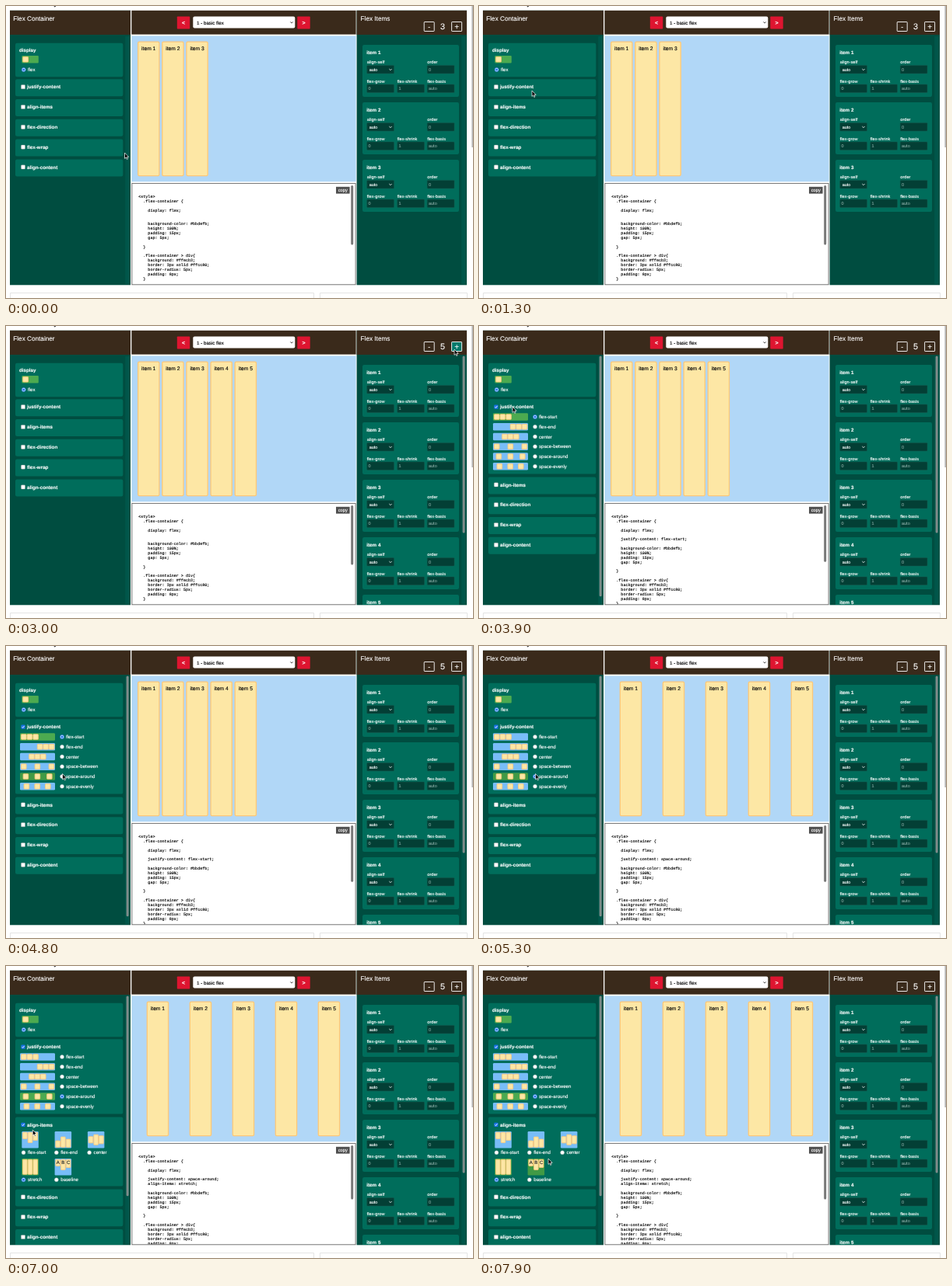
An HTML page that plays this animation: 600 by 376 pixels, repeating every 8000 ms.

```html
<!DOCTYPE html>
<html lang="en">
<head>
<meta charset="utf-8">
<title>Flex playground</title>
<style>
  html, body { margin: 0; width: 100%; height: 100%; overflow: hidden; background: #fff; }
  svg { display: block; width: 600px; height: 376px; }
  text { font-family: "Liberation Sans", Arial, sans-serif; white-space: pre; text-rendering: geometricPrecision; }
  .code { font-family: "Liberation Mono", monospace; }
</style>
</head>
<body>
<svg id="stage" viewBox="0 0 600 376">
  <defs>
    <clipPath id="leftClip"><rect x="5" y="38" width="155" height="321"/></clipPath>
    <clipPath id="rightClip"><rect x="450" y="38" width="142" height="321"/></clipPath>
    <clipPath id="codeClip"><rect x="163" y="229" width="285" height="129.3"/></clipPath>
  </defs>
  <g id="base"></g>
  <g id="page"></g>
  <path id="cursor" d="M0 0V7.4L1.7 5.9L2.8 8.4L4 7.9L2.9 5.4H5.2Z" fill="#000" stroke="#fff" stroke-width=".7"/>
</svg>
<script>
const DURATION = 8000;
const C = {
  brown: '#3a2a1b', panel: '#004d40', card: '#006d5b', input: '#033f35',
  sky: '#b1d7f7', blue: '#78bdf8', green: '#4caa50', hover: '#419a45', cream: '#fde7a5',
  orange: '#ffc877', accent: '#1a73e8', red: '#de1530', thumb: '#7f8c89'
};

const rect = (x, y, w, h, fill, r = 0, extra = '') =>
  `<rect x="${x}" y="${y}" width="${w}" height="${h}" rx="${r}" fill="${fill}" ${extra}/>`;
const line = (d, stroke, w) =>
  `<path d="${d}" fill="none" stroke="${stroke}" stroke-width="${w}"/>`;
// A hairline stroke gives small type the weight of heavier smoothing.
const text = (x, y, s, size = 6.1, fill = '#fff', extra = '') =>
  `<text x="${x}" y="${y}" font-size="${size}" fill="${fill}" stroke="${fill}" stroke-width=".14" ${extra}>${s.replace(/</g, '&lt;').replace(/>/g, '&gt;')}</text>`;
const bold = (x, y, s) => text(x, y, s, 6.25, '#fff', 'font-weight="700"');
const middle = 'text-anchor="middle"';
const chevron = (x, y, color) =>
  line(`M${x - 1.7} ${y - .8}l1.7 1.7l1.7 -1.7`, color, .8);

function radio(x, y, on) {
  const ring = `<circle cx="${x}" cy="${y}" r="2.5" fill="#fff" stroke="${on ? C.accent : '#9aa'}" stroke-width="${on ? .8 : .4}"/>`;
  return ring + (on ? `<circle cx="${x}" cy="${y}" r="1.5" fill="${C.accent}"/>` : '');
}

function checkbox(x, y, on) {
  const box = rect(x - 2.6, y - 2.6, 5.2, 5.2, on ? C.accent : '#fff', .9, on ? '' : 'stroke="#8a8a8a" stroke-width=".4"');
  return box + (on ? line(`M${x - 1.5} ${y}l1.1 1.2l2 -2.5`, '#fff', .9) : '');
}

const chip = (x, y, w, h) =>
  rect(x + .4, y + .4, w - .8, h - .8, C.cream, .7, `stroke="${C.orange}" stroke-width=".8"`);

const VIEW = { top: 38, height: 321, padding: 77 };
function scrollThumb(x, contentEnd) {
  const content = contentEnd - VIEW.top + VIEW.padding;
  return content > VIEW.height ? rect(x, VIEW.top + .6, 3, VIEW.height ** 2 / content, C.thumb, 1.5) : '';
}

const JUSTIFY = [
  ['flex-start', [22.8, 30.4, 38.1]], ['flex-end', [43.6, 51.1, 58.6]],
  ['center', [33, 40.4, 47.8]], ['space-between', [22.8, 40.4, 58.4]],
  ['space-around', [25.4, 40.4, 55.8]], ['space-evenly', [26.4, 40.2, 53.8]]
];
const ALIGN = ['flex-start', 'flex-end', 'center', 'stretch', 'baseline'];
const BAR_HEIGHTS = [9, 14, 11];

const justifyRowY = i => 117 + 12.75 * i;
const alignCell = i => [20.3 + 42.3 * (i % 3), 213 + 35 * Math.floor(i / 3)];
const tileColor = (on, hovered) => hovered ? C.hover : on ? C.green : C.blue;

function justifyOptions(s) {
  return JUSTIFY.map(([name, centers], i) => {
    const y = justifyRowY(i), on = s.justify === name;
    return rect(18, y - 4.8, 45, 9.6, tileColor(on, s.hoverJustify === i), 1.4)
      + centers.map(x => chip(x - 3.7, y - 3.7, 7.4, 7.4)).join('')
      + radio(72, y, on) + text(77, y + 2.2, name);
  }).join('');
}

function alignOptions(s) {
  return ALIGN.map((name, i) => {
    const [x, y] = alignCell(i), on = name === 'stretch';
    let out = rect(x, y, 21.5, 21.5, tileColor(on, s.hoverAlign === i), 1.2);
    BAR_HEIGHTS.forEach((height, k) => {
      const h = on ? 19.9 : height;
      const free = 19.9 - h;
      const offset = [0, free, free / 2, 0, 0][i];
      const bx = x + .8 + 6.7 * k;
      out += chip(bx, y + .8 + offset, 6.5, h);
      if (name === 'baseline') out += text(bx + 3.25, y + 6.8, 'ABC'[k], 6, '#222', middle);
    });
    return out + radio(x + 2.2, y + 27.2, on) + text(x + 7.7, y + 29.4, name);
  }).join('');
}

function leftPanel(s) {
  const card = (y, h) => rect(12, y, 138.3, h, C.card, 2.2);
  let out = card(47.8, 43.4) + bold(17, 58.5, 'display')
    + rect(20.3, 64, 21.5, 9.5, C.green, 1) + chip(21.3, 65, 7.6, 7.5)
    + radio(22.7, 82, true) + text(28, 84.2, 'flex');
  const sections = [
    ['justify-content', s.justify && 74.4, justifyOptions],
    ['align-items', s.align && 67.2, alignOptions],
    ['flex-direction'], ['flex-wrap'], ['align-content']
  ];
  let y = 94.2;
  for (const [name, extra, options] of sections) {
    const h = 22 + (extra || 0);
    out += card(y, h) + checkbox(22, y + 10, extra) + bold(27, y + 12.1, name);
    if (extra) out += options(s);
    y += h + 3.8;
  }
  return `<g clip-path="url(#leftClip)">${out}${scrollThumb(154.6, y - 3.8)}</g>`;
}

function itemCard(i) {
  const y = 50 + 74 * i;
  const field = (x, dy, label, value, select) =>
    text(x + .3, y + dy, label, 5.6)
    + rect(x + .2, y + dy + 2.4, 34.8, 10.6, C.input, 1, 'stroke="#16584c" stroke-width=".5"')
    + text(x + (select ? 3.2 : 2), y + dy + 9.7, value, 5.5, select ? '#fff' : '#81a59e')
    + (select ? chevron(x + 30.5, y + dy + 7.8, '#fff') : '');
  return rect(458, y, 124, 67, C.card, 2.2) + bold(463.3, y + 11.5, `item ${i + 1}`)
    + field(463.5, 24, 'align-self', 'auto', true) + field(541, 24, 'order', '0')
    + field(463.5, 48.5, 'flex-grow', '0') + field(502.5, 48.5, 'flex-shrink', '1')
    + field(541, 48.5, 'flex-basis', 'auto');
}

function rightPanel(s) {
  let out = '';
  for (let i = 0; i < s.count; i++) out += itemCard(i);
  out += scrollThumb(586.6, 50 + 74 * s.count - 7);
  const button = (x, sign, fill) =>
    rect(x, 20.5, 13, 12, fill, .6, 'stroke="#fff" stroke-width=".9"')
    + text(x + 6.5, 29.8, sign, 10, '#fff', middle);
  return `<g clip-path="url(#rightClip)">${out}</g>`
    + button(537.2, '-', C.brown) + button(572.6, '+', s.hoverPlus ? '#00796b' : C.brown)
    + text(561, 30.3, String(s.count), 10.8, '#fff', middle);
}

function boxes(s) {
  const around = s.justify === 'space-around';
  let out = '';
  for (let i = 0; i < s.count; i++) {
    const x = around ? 180.7 + 55 * i : 169 + 31.15 * i;
    out += rect(x + .6, 46.2, 27.3, 172.4, C.cream, 1.6, `stroke="${C.orange}" stroke-width="1.3"`)
      + text(x + 14.2, 57, `item ${i + 1}`, 6.7, '#000', middle);
  }
  return out;
}

function code(s) {
  const lines = ['<style>', '  .flex-container {', '', '    display: flex;', ''];
  if (s.justify) lines.push(`    justify-content: ${s.justify};`);
  if (s.align) lines.push('    align-items: stretch;');
  lines.push('', '    background-color: #bbdefb;', '    height: 100%;', '    padding: 15px;', '    gap: 5px;',
    '', '  }', '', '  .flex-container > div{', '    background: #ffecb3;', '    border: 3px solid #ffcc80;',
    '    border-radius: 5px;', '    padding: 8px;', '  }');
  const rows = lines.map((l, i) =>
    text(170.2, 246.9 + 5.88 * i, l, 5.07, '#000', 'class="code" xml:space="preserve"')).join('');
  return `<g clip-path="url(#codeClip)">${rows}${rect(443.2, 231, 3, 1530 / (lines.length + 1), '#777', 1.5)}</g>`;
}

function base() {
  const panel = (x, w) => rect(x, 5.8, w, 353.5, C.panel) + rect(x, 5.8, w, 31.2, C.brown);
  const arrow = (x, sign) => rect(x, 13.5, 16.4, 16, C.red, .8)
    + text(x + 8.2, 23.8, sign, 7, '#fff', middle + ' font-weight="700"');
  return text(61.5, -1.2, 'y', 10, '#111')
    + panel(5, 155) + panel(450.6, 141.4)
    + rect(153.2, 39, 5.6, 319, '#00564a') + rect(585.2, 39, 5.6, 319, '#00564a')
    + text(9.3, 19, 'Flex Container', 8.2) + text(455.6, 19, 'Flex Items', 8.2)
    + rect(161.3, 5.8, 288.3, 30.8, C.brown) + rect(161.3, 38.4, 288.3, 187.8, C.sky)
    + arrow(219.8, '<') + arrow(374.3, '>')
    + rect(240.3, 13.4, 131, 15.2, '#fff', 2) + text(245, 23.6, '1 - basic flex', 6.2, '#000') + chevron(367, 21.2, '#222')
    + rect(161.8, 228.4, 287.3, 130.4, '#fff', 0, 'stroke="#666" stroke-width=".9"')
    + rect(424, 232.8, 17.6, 8.8, '#505050') + text(432.8, 239, 'copy', 5.8, '#fff', middle)
    + line('M5.5 376V369.5H395.5V376M403.5 376V369.5H592.5V376', '#dedede', .8)
    + rect(598.4, 0, 1.6, 182, '#b4b4b4');
}

// Pointer stops: [arrive, leave, x, y]
const STOPS = [
  [0, 300, 152.5, 189], [1200, 1400, 68, 109], [2100, 3150, 576, 30],
  [3700, 3950, 43, 104], [4700, 5400, 72.5, 164.5], [6100, 6250, 32.5, 209.5],
  [6500, 6800, 24, 204], [7600, 8000, 89, 248]
];

function pointer(t) {
  const i = STOPS.findIndex(([arrive]) => arrive > t);
  const [, leave, x, y] = STOPS[i < 0 ? STOPS.length - 1 : i - 1];
  if (i < 0 || t <= leave) return [x, y];
  const [arrive, , x2, y2] = STOPS[i];
  const u = (t - leave) / (arrive - leave), e = u * u * (3 - 2 * u);
  return [x + (x2 - x) * e, y + (y2 - y) * e];
}

function stateAt(t, x, y) {
  const s = {
    count: t < 2800 ? 3 : t < 3000 ? 4 : 5,
    justify: t < 3800 ? '' : t < 5100 ? 'flex-start' : 'space-around',
    align: t >= 6600,
    hoverPlus: x >= 572 && x <= 586 && y >= 19 && y <= 33
  };
  s.hoverJustify = s.justify && x > 17 && x < 118
    ? JUSTIFY.findIndex((_, i) => Math.abs(y - justifyRowY(i)) < 6.3) : -1;
  s.hoverAlign = s.align ? ALIGN.findIndex((_, i) => {
    const [cx, cy] = alignCell(i);
    return x >= cx && x < cx + 36 && y >= cy - 1 && y < cy + 31;
  }) : -1;
  return s;
}

const $ = id => document.getElementById(id);
$('base').innerHTML = base();
let lastKey = '';

function render(t) {
  const [x, y] = pointer(t);
  const state = stateAt(t, x, y), key = JSON.stringify(state);
  if (key !== lastKey) {
    $('page').innerHTML = leftPanel(state) + boxes(state) + code(state) + rightPanel(state);
    lastKey = key;
  }
  $('cursor').setAttribute('transform', `translate(${x.toFixed(2)} ${y.toFixed(2)})`);
}

const start = performance.now();
function tick() {
  render((performance.now() - start) % DURATION);
  requestAnimationFrame(tick);
}
tick();
</script>
</body>
</html>
```
